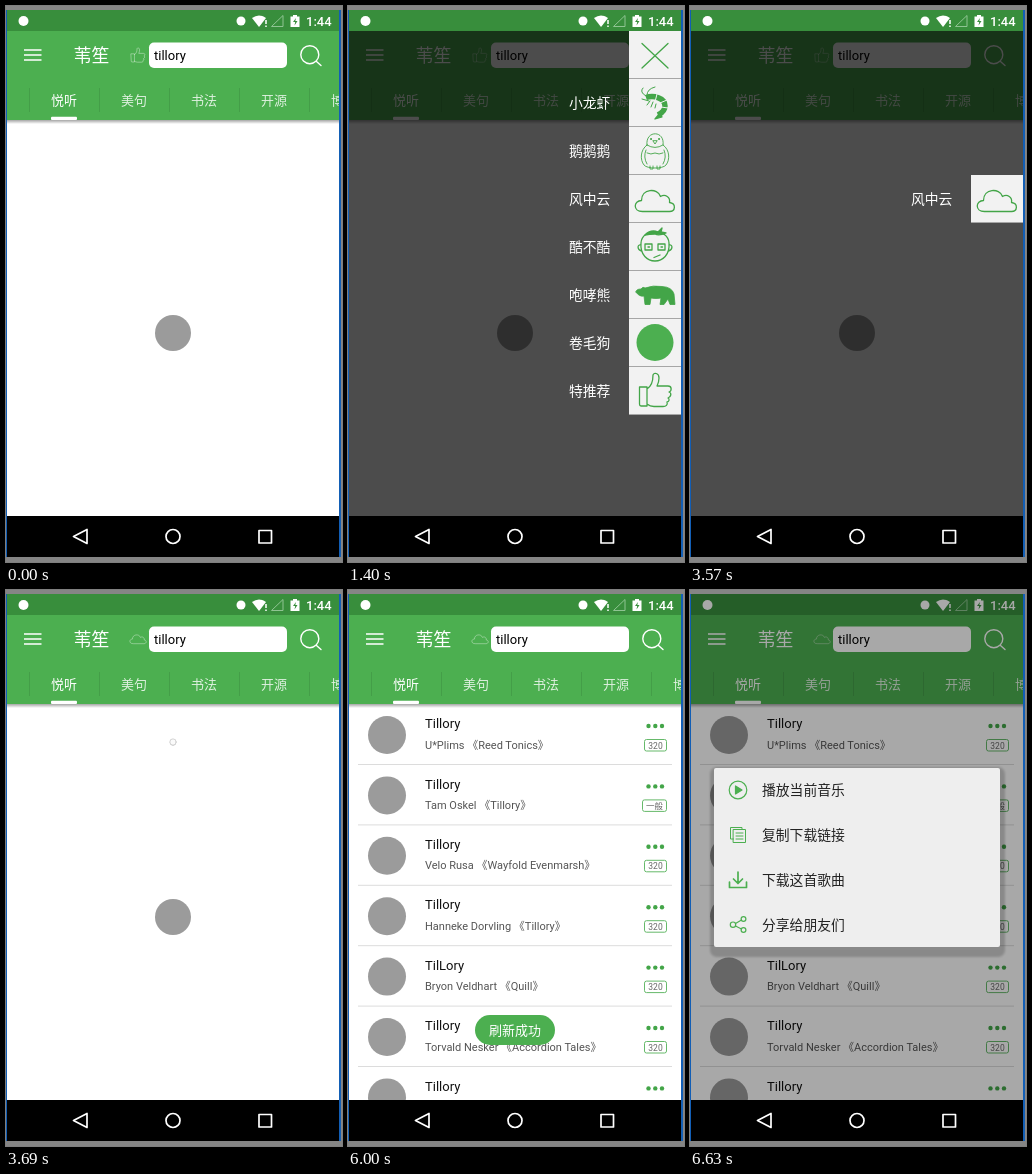
An HTML page that plays this animation: 336x556 px, repeating every 8000 ms.

```html
<!DOCTYPE html>
<html lang="zh-CN">
<head>
<meta charset="utf-8">
<title>Music app</title>
<style>
  html, body { margin: 0; width: 100%; height: 100%; overflow: hidden; background: #858585; }
  body { position: relative; font-family: Roboto, "Noto Sans CJK SC", "Noto Sans CJK", sans-serif; }
  svg { display: block; }
  #app { position: absolute; left: 0; top: 0; }
  .line { fill: none; stroke-linecap: round; stroke-linejoin: round; }
  .line * { vector-effect: non-scaling-stroke; }
  .cell { position: absolute; left: 281px; width: 52px; height: 48px; box-sizing: border-box;
          background: #f2f2f2; border-bottom: 1px solid #a6a6a6; backface-visibility: hidden; }
  .cell svg { stroke: #43a548; stroke-width: 1.3; }
  .label { position: absolute; left: 221px; color: #fff; font-size: 13.8px; line-height: 20px; white-space: nowrap; }
</style>
</head>
<body>
<svg id="app" width="336" height="556" viewBox="0 0 336 556">
  <defs>
    <linearGradient id="shade" x2="0" y2="1">
      <stop stop-color="#000" stop-opacity=".35"/><stop offset="1" stop-color="#000" stop-opacity="0"/>
    </linearGradient>
    <filter id="soft" x="-30%" y="-30%" width="160%" height="160%"><feGaussianBlur stdDeviation="1.2"/></filter>
    <path id="cloud" d="M14 35C4 35 5 24 13 24C13 12 29 11 32 20C37 17 42 21 41 26C48 27 47 35 41 35Z"/>
    <path id="thumb" d="M10.500 20H18V39H12Q10.500 39 10.500 37ZM18 22C23 19 24 14 24 8C25 5 30 6 30 11C30 14 29 17 28 19H39C43 19 43 24 40 25C43 26 42 30 39 31C41 32 40 35 38 35C39 38 37 39.500 34 39.500H25Q21 39.500 18 37"/>
  </defs>

  <rect y="4" width="335" height="547" fill="#125eb5"/>
  <rect x="1" y="114" width="332" height="396" fill="#fff"/>
  <circle id="mark" cx="167" cy="327" r="18" fill="#9b9b9b"/>
  <g id="list"></g>
  <g id="spinner" class="line">
    <circle cy="1.500" r="18.500" fill="#000" opacity=".35" filter="url(#soft)"/>
    <circle r="18.500" fill="#fafafa" stroke="#ccc" stroke-width=".8"/>
    <path id="arc" d="M0-7.500A7.500 7.500 0 1 1-7.500 0" stroke="#4caf50" stroke-width="2"/>
  </g>
  <g id="toast">
    <rect x="127" y="425" width="80" height="30" rx="15" fill="#4caf50"/>
    <text x="167" y="445" font-size="13" fill="#fff" text-anchor="middle">刷新成功</text>
  </g>

  <rect x="1" y="4" width="332" height="21" fill="#388e3c"/>
  <rect x="1" y="25" width="332" height="89" fill="#4caf50"/>
  <rect x="1" y="114" width="332" height="4" fill="url(#shade)"/>

  <g fill="#fff">
    <circle cx="17.500" cy="15" r="5"/>
    <circle cx="235" cy="15" r="4.500"/>
    <path d="M246 12Q253 7 260 12L253 21Z"/>
    <path d="M260 14v4M260 19.500v1.500" stroke="#fff" stroke-width="1.500"/>
    <path d="M265.500 20.500H277V9.500Z" fill="none" stroke="#8fc492"/>
    <path d="M284.500 10.500h2.500V9h4v1.500h2.500V21H284.500Z"/>
    <path d="M290 12l-3 4h2.200l-.7 3.500 3-4.500h-2.200Z" fill="#388e3c"/>
    <text x="300" y="19.700" font-size="13" font-weight="500">1:44</text>
  </g>

  <path d="M18 44H35.500M18 49H35.500M18 54H35.500" stroke="#fff" stroke-width="1.700"/>
  <text x="67.500" y="55.700" font-size="18" fill="#fff">苇笙</text>
  <g class="line" stroke="#fff" stroke-width="1">
    <use id="barThumb" href="#thumb" transform="translate(120.700 39.200) scale(.43)"/>
    <use id="barCloud" href="#cloud" transform="translate(121 39) scale(.42)"/>
  </g>
  <rect x="143" y="36.500" width="138" height="25.500" rx="5" fill="#fff"/>
  <text x="148" y="54" font-size="13">tillory</text>
  <g class="line" stroke="#fff" stroke-width="1.400"><circle cx="303.800" cy="48.700" r="9"/><path d="M310.500 55.500L315 59.500"/></g>
  <svg id="tabs" x="1" y="78" width="332" height="36" viewBox="1 78 332 36" fill="#fff" font-size="13"></svg>

  <rect id="dim" x="1" y="25" width="332" height="485"/>
  <rect id="veil" x="1" y="4" width="332" height="506"/>
  <g id="dialog">
    <rect x="20" y="177" width="295" height="190" rx="7" opacity=".18" filter="url(#soft)"/>
    <rect x="24" y="178" width="286" height="179" rx="2" fill="#eee"/>
    <g class="line" stroke="#4caf50" stroke-width="1.200">
      <circle cx="48" cy="200" r="8.800"/><path d="M45.500 196V204L52 200Z" fill="#4caf50"/>
      <path d="M43.500 249H40.500V237.500H52V239.500M43.500 239.500H55.500V252.500H43.500ZM46 243H53M46 246H53M46 249H53" stroke-width="1"/>
      <path d="M48 282V293M43.500 289L48 293.500L52.500 289M39.500 292V297.500H56.500V292" stroke-width="1.700"/>
      <path d="M45.500 333.500L51.500 330M45.500 336L51.500 339"/>
      <circle cx="43" cy="334.700" r="2.700"/><circle cx="53.500" cy="329" r="2.400"/><circle cx="53.500" cy="340" r="2.400"/>
    </g>
    <g font-size="13.800" fill="#222">
      <text x="72" y="205">播放当前音乐</text><text x="72" y="250">复制下载链接</text>
      <text x="72" y="295">下载这首歌曲</text><text x="72" y="339.500">分享给朋友们</text>
    </g>
  </g>

  <rect x="1" y="510" width="332" height="41"/>
  <g fill="none" stroke="#fff" stroke-width="1.700" stroke-linejoin="round">
    <path d="M67.500 530.500L81 523.500V537.500Z"/><circle cx="167" cy="530.500" r="7"/><rect x="253" y="524.500" width="12.500" height="12.500"/>
  </g>
</svg>
<div id="menu"></div>

<script>
const $ = id => document.getElementById(id);
const clamp = v => Math.max(0, Math.min(1, v));

$('tabs').innerHTML = ['悦听', '美句', '书法', '开源', '博文'].map((name, i) =>
  `<text x="${45 + 70 * i}" y="98.700" opacity="${i ? .82 : 1}">${name}</text>
   <path d="M${23.5 + 70 * i} 82V106" stroke="#449e48"/>`).join('') +
  '<rect x="45" y="110.800" width="26" height="3.200" rx="1"/>';

const songs = [
  ['Tillory', 'U*Plims 《Reed Tonics》'],
  ['Tillory', 'Tam Oskel 《Tillory》', '一般'],
  ['Tillory', 'Velo Rusa 《Wayfold Evenmarsh》'],
  ['Tillory', 'Hanneke Dorvling 《Tillory》'],
  ['TilLory', 'Bryon Veldhart 《Quill》'],
  ['Tillory', 'Torvald Nesker 《Accordion Tales》'],
  ['Tillory', '']
];
$('list').innerHTML = songs.map(([title, artist, badge = '320'], i) => {
  const wide = badge === '320' ? 22 : 24;
  return `<g transform="translate(0 ${60.4 * i})">
    <circle cx="39" cy="145" r="19" fill="#9b9b9b"/>
    <text x="77" y="138.300" font-size="13" fill="#111">${title}</text>
    <text x="77" y="158.700" font-size="11" fill="#555">${artist}</text>
    <g fill="#43a548"><circle cx="300.500" cy="136" r="2.200"/><circle cx="307.300" cy="136" r="2.200"/><circle cx="314" cy="136" r="2.200"/></g>
    <rect x="${318.5 - wide}" y="149.500" width="${wide}" height="11.500" rx="2" fill="none" stroke="#66b96a"/>
    <text x="${318.5 - wide / 2}" y="158.500" font-size="8.500" fill="#666" text-anchor="middle">${badge}</text>
    <path d="M10 174.500H324" stroke="#dcdcdc"/></g>`;
}).join('');

const icons = {
  close: '<path d="M13 12.500L39 37M39 12.500L13 37"/>',
  shrimp: `<path d="M17 18.500C25 16 36 19 36 27C36 31 33 34 29 36" stroke-width="5.500" stroke-linecap="butt"/>
    <path d="M17 17Q10 13 14 9M18 16Q18 10 26 8M13 20L20 22M21 22L18 26M24 23L22 28M27 25L26 29" stroke-width="1"/>
    <path d="M31 34L26 40L33 38Z" fill="#43a548"/>
    <path d="M28 15L26 23M38 21L31 24M39 29L32 28" stroke="#f2f2f2" stroke-width="1"/>`,
  goose: `<g stroke-width=".9"><path d="M18 18C16 3 36 3 34 18C41 23 41 33 37 38C34 42 18 42 15 38C11 33 11 23 18 18ZM18 18Q26 23 34 18M17 23Q14 30 18 37M35 23Q38 30 34 37M18 26Q22 28 26 26Q30 28 34 26M21 39V42H24V39M28 39V42H31V39"/>
    <path d="M24 14L26 17L28 14Z"/></g><path d="M22 12h.1M30 12h.1" stroke-width="2"/>`,
  cloud: '<use href="#cloud" x="-.5" y="1.500"/>',
  face: `<path d="M12 20C13 5 39 5 40 20C42 44 10 44 12 20ZM12 22C8 21 8 27 12.500 28M40 22C44 21 44 27 39.500 28"/>
    <path d="M16 12Q22 6 29 9L33 5L32 9L37 10Q30 13 26 11Q20 11 16 12Z" fill="#43a548"/>
    <path d="M16 21H23V27H16ZM29 21H36V27H29ZM19 24H20.500M32 24H33.500M25 34.500L31 32"/>`,
  bear: '<path d="M7 21Q7 18 12 18Q14 15 16 17Q24 14 33 15.500Q43 16 45 23L46 33.500H41L39 28L35 33.500H31L32 27Q27 28 22 27L21 33.500H16L15 25Q10 26 7 21Z" fill="#43a548" stroke-width=".8"/>',
  dog: '<circle cx="26" cy="23.500" r="18.500" fill="#4caf50" stroke="none"/>',
  thumb: '<use href="#thumb"/>'
};
const names = ['', '小龙虾', '鹅鹅鹅', '风中云', '酷不酷', '咆哮熊', '卷毛狗', '特推荐'];
const chosen = 3;
$('menu').innerHTML = Object.values(icons).map((icon, i) =>
  `<div class="cell" style="top:${25 + 48 * i}px"><svg class="line" width="52" height="48" viewBox="0 0 52 48">${icon}</svg></div>
   <div class="label" style="top:${87 + 48 * (i - 1)}px">${names[i]}</div>`).join('');
const cells = [...document.querySelectorAll('.cell')];
const labels = [...document.querySelectorAll('.label')];

// Each row lists only what differs from the idle screen.
const idle = { open: 0, fold: 0, dim: 0, spin: 0, list: 0, toast: 0, veil: 0, dialog: 0 };
const steps = [
  [0, {}],
  [710, { dim: .7, open: 1.37 }],
  [860, { dim: .7, open: 2.61 }],
  [1010, { dim: .7, open: 4 }],
  [1130, { dim: .7, open: 5.4 }],
  [1280, { dim: .7, open: 6.8 }],
  [1400, { dim: .7, open: 7 }],
  [3020, { dim: .7, open: 7, fold: .56 }],
  [3170, { dim: .7, open: 7, fold: 1 }],
  [3320, { dim: .7, open: 7, fold: 2.2 }],
  [3570, { dim: .7, open: 7, fold: 4 }],
  [3690, { spin: .17 }],
  [3810, { spin: .8 }],
  [4120, { list: .45 }],
  [4270, { list: .85 }],
  [4390, { list: 1, toast: .5 }],
  [4540, { list: 1, toast: 1 }],
  [6270, { list: 1, toast: .5 }],
  [6390, { list: 1, veil: .12, dialog: .3 }],
  [6510, { list: 1, veil: .26, dialog: .8 }],
  [6630, { list: 1, veil: .34, dialog: 1 }]
];

function drawMenu({ open, fold }) {
  cells.forEach((cell, i) => {
    const above = i < chosen;
    const level = above ? i : cells.length - 1 - i;
    const shown = i ? clamp(open - i + 1) : clamp(open);
    const left = i === chosen ? 1 : 1 - clamp(fold - level);
    const p = Math.min(shown, left);
    const closingUp = above && left < 1;
    cell.style.visibility = labels[i].style.visibility = p > 0 ? 'visible' : 'hidden';
    cell.style.transformOrigin = closingUp ? '50% 100%' : '50% 0';
    cell.style.transform = p === 1 ? 'none'
      : closingUp ? `scaleY(${Math.sin(Math.PI / 2 * Math.min(1, p * 1.6))})`
      : `perspective(220px) rotateX(${-90 * (1 - p)}deg)`;
    labels[i].style.opacity = p;
    labels[i].style.transform = `translateX(${8 * (1 - p)}px)`;
  });
}

function draw(t) {
  const s = { ...idle, ...steps.findLast(([at]) => at <= t)[1] };
  drawMenu(s);
  for (const id of ['dim', 'list', 'toast', 'veil']) $(id).setAttribute('opacity', s[id]);
  $('mark').setAttribute('opacity', s.list ? 0 : 1);
  $('barThumb').setAttribute('opacity', t < 3690 ? .85 : 0);
  $('barCloud').setAttribute('opacity', t < 3690 ? 0 : .85);
  $('spinner').setAttribute('transform', `translate(167 152) scale(${s.spin})`);
  $('spinner').setAttribute('opacity', s.spin ? 1 : 0);
  $('arc').setAttribute('opacity', clamp(2 * s.spin - .6));
  const size = .85 + .15 * s.dialog;
  $('dialog').setAttribute('opacity', s.dialog);
  $('dialog').setAttribute('transform', `translate(167 268) scale(${size}) translate(-167 -268)`);
}

const start = performance.now();
function tick() {
  draw((performance.now() - start) % 8000);
  requestAnimationFrame(tick);
}
tick();
</script>
</body>
</html>
```
